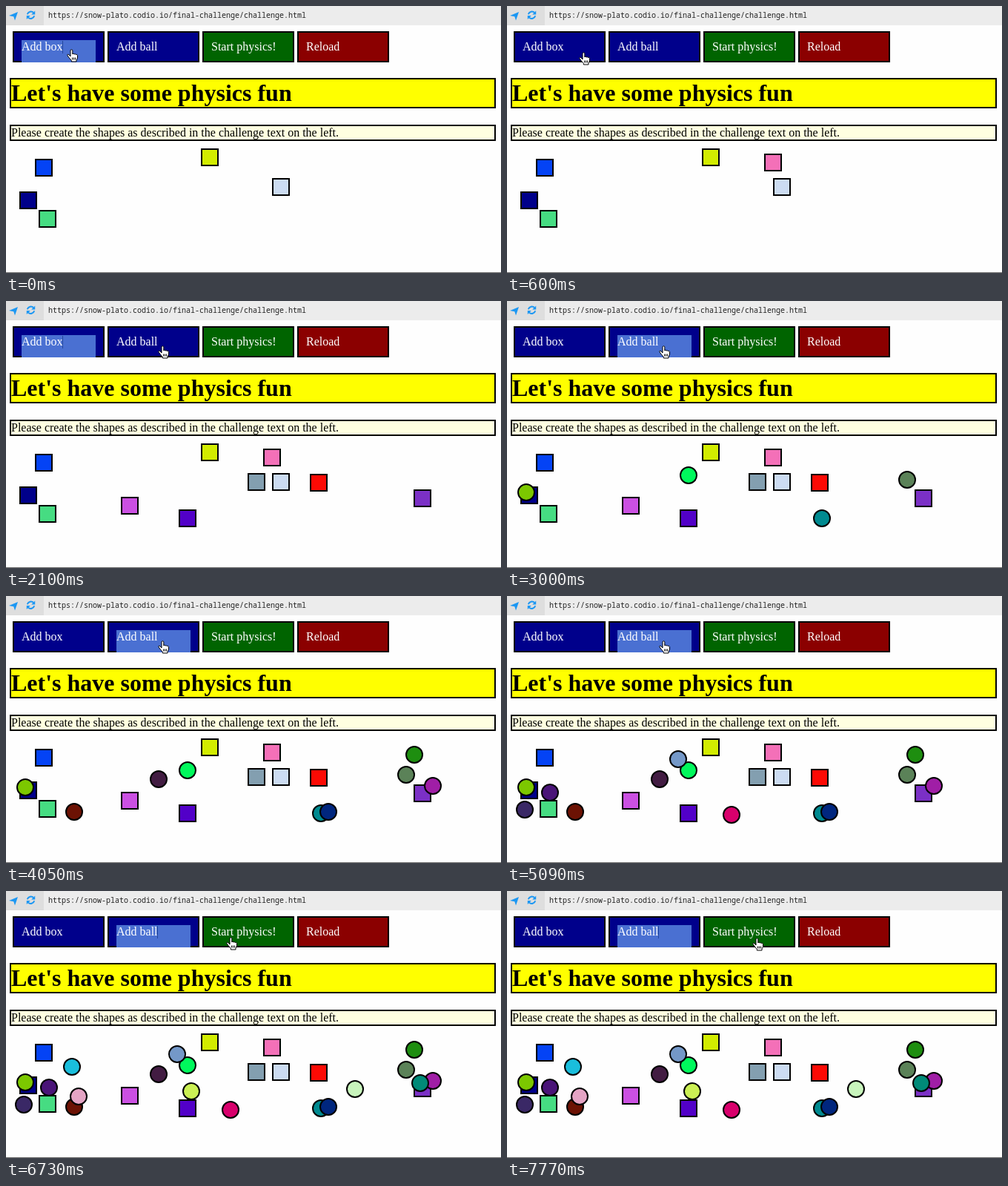
An HTML page that plays this animation: 668 by 360 pixels, repeating every 8000 ms.

```html
<!DOCTYPE html>
<html lang="en">
<head>
<meta charset="utf-8">
<title>Physics fun</title>
<style>
  html, body { margin: 0; width: 668px; height: 360px; overflow: hidden; background: #fff; }
  svg { display: block; }
  text { font: 16px "Liberation Serif", "Times New Roman", serif; white-space: pre; }
  text.url { font: 10px "Noto Sans Mono", monospace; fill: #222; }
  text.title { font-size: 32px; font-weight: bold; }
</style>
</head>
<body>
<svg id="stage" width="668" height="360" viewBox="0 0 668 360">
  <rect width="668" height="360" fill="#fefefe"/>
  <rect width="668" height="26" fill="#ececec"/>
  <rect width="51" height="26" fill="#dedede"/>
  <path d="M4 13 16 8 12 19.5 10.3 14.2Z" fill="#1b97f3"/>
  <g fill="none" stroke="#1b97f3" stroke-width="2">
    <path d="M28.8 11.2A5 5 0 0 1 37.2 9M38.2 13.2A5 5 0 0 1 29.8 15.4"/>
    <path d="M39.2 6.5V11.5H34.2ZM27.8 18V13H32.8Z" fill="#1b97f3" stroke="none"/>
  </g>
  <text class="url" x="57" y="16">https://snow-plato.codio.io/final-challenge/challenge.html</text>
  <g id="buttons"></g>
  <g id="panels" stroke="#000" stroke-width="2">
    <rect x="6" y="98" width="654" height="39" fill="#ff0"/>
    <rect x="6" y="161" width="654" height="20" fill="#ffffe0"/>
  </g>
  <text class="title" x="7" y="128">Let's have some physics fun</text>
  <text x="7" y="176">Please create the shapes as described in the challenge text on the left.</text>
  <g id="shapes" stroke="#000" stroke-width="2"></g>
  <rect y="359" width="668" height="1" fill="#666"/>
  <g id="hand" stroke="#000" stroke-linejoin="round">
    <path fill="#fff" d="M5 10V2.2a1.4 1.4 0 0 1 2.8 0V7a1.3 1.3 0 0 1 2.4.2 1.3 1.3 0 0 1 2.3.5 1.2 1.2 0 0 1 2 .9V12L13 15v2H6.3v-1.5L3.2 11.8 1 8.8C.2 7.4 1.8 6.6 2.9 7.7Z"/>
    <path fill="none" d="M7.5 11.5v3M9.5 11.5v3M11.5 11.5v3"/>
  </g>
</svg>
<script>
const LOOP = 8000;
const $ = id => document.getElementById(id);

function add(parent, tag, attrs, label) {
  const el = document.createElementNS("http://www.w3.org/2000/svg", tag);
  for (const key in attrs) el.setAttribute(key, attrs[key]);
  if (label) el.textContent = label;
  parent.append(el);
  return el;
}

const show = (el, on) => el.setAttribute("visibility", on ? "visible" : "hidden");

function button(x, label, fill, caretX) {
  const group = $("buttons");
  add(group, "rect", { x: x + 1, y: 35, width: 122, height: 40, fill, stroke: "#000", "stroke-width": 2 });
  const mark = caretX && add(group, "rect", { x: x + 12, y: 46, width: 100, height: 30, fill: "#4a70d2" });
  const caret = caretX && add(group, "rect", { x: caretX, y: 47, width: 1, height: 17, fill: "#24489c" });
  add(group, "text", { x: x + 12, y: 60, fill: "#fff" }, label);
  return { mark, caret };
}

const boxButton = button(9, "Add box", "#00008b", 76);
const ballButton = button(137, "Add ball", "#00008b", 204);
button(265, "Start physics!", "#006400");
button(393, "Reload", "#8b0000");

// [appears at, left, top, colour]
const boxes = [
  [0, 39, 206, "#0443f5"], [0, 18, 250, "#00008a"], [0, 44, 275, "#46dc82"],
  [0, 263, 192, "#d2ec00"], [0, 359, 232, "#ccdcf2"],
  [600, 347, 199, "#f470b8"], [750, 326, 232, "#839fb0"], [1050, 550, 254, "#7b30c6"],
  [1200, 233, 281, "#5200c8"], [1350, 410, 233, "#fc0a04"], [1650, 155, 264, "#cb50e2"]
];
const balls = [
  [2250, 14, 246, "#7cc800"], [2550, 233, 223, "#00f85c"], [2700, 413, 281, "#008a90"],
  [3000, 528, 229, "#5b8258"], [3150, 423, 279, "#00267e"],
  [3450, 194, 235, "#421c42"], [3600, 564, 244, "#a01ea6"],
  [3900, 80, 279, "#6c1204"], [4050, 539, 202, "#1e8e10"], [4350, 291, 283, "#d8006c"],
  [4650, 219, 208, "#7498c8"], [4790, 46, 253, "#4a1478"],
  [5090, 12, 276, "#3a2866"], [5230, 77, 225, "#1abedc"],
  [5530, 86, 265, "#e4a4c4"], [5680, 238, 258, "#cbf054"],
  [5980, 547, 247, "#008a78"], [6430, 459, 255, "#c8f4bc"]
];
const shapes = [
  ...boxes.map(([at, x, y, fill]) =>
    ({ at, el: add($("shapes"), "rect", { x: x + 1, y: y + 1, width: 22, height: 22, fill }) })),
  ...balls.map(([at, x, y, fill]) =>
    ({ at, el: add($("shapes"), "circle", { cx: x + 12, cy: y + 12, r: 11, fill }) }))
];

// Pointer stops: [time, x, y], each held until the next
const stops = [
  [0, 82, 58], [300, 86, 59], [450, 93, 61], [600, 97, 62], [900, 102, 64],
  [1800, 128, 65], [1950, 178, 62], [2100, 205, 60],
  [6580, 256, 60], [6730, 297, 62], [6880, 306, 62], [7030, 312, 61],
  [7170, 316, 61], [7320, 318, 62], [7470, 319, 62], [7620, 327, 63], [7770, 331, 63]
];

function draw(t) {
  for (const s of shapes) show(s.el, t >= s.at);
  const boxOn = t < 600 || (t >= 750 && t < 2250);
  show(boxButton.mark, boxOn);
  show(boxButton.caret, boxOn);
  show(ballButton.mark, t >= 2550);
  show(ballButton.caret, t >= 6580);
  const [, x, y] = stops.findLast(stop => stop[0] <= t);
  $("hand").setAttribute("transform", `translate(${x} ${y})`);
}

const start = performance.now();
function tick() {
  draw((performance.now() - start) % LOOP);
  requestAnimationFrame(tick);
}
tick();
</script>
</body>
</html>
```
